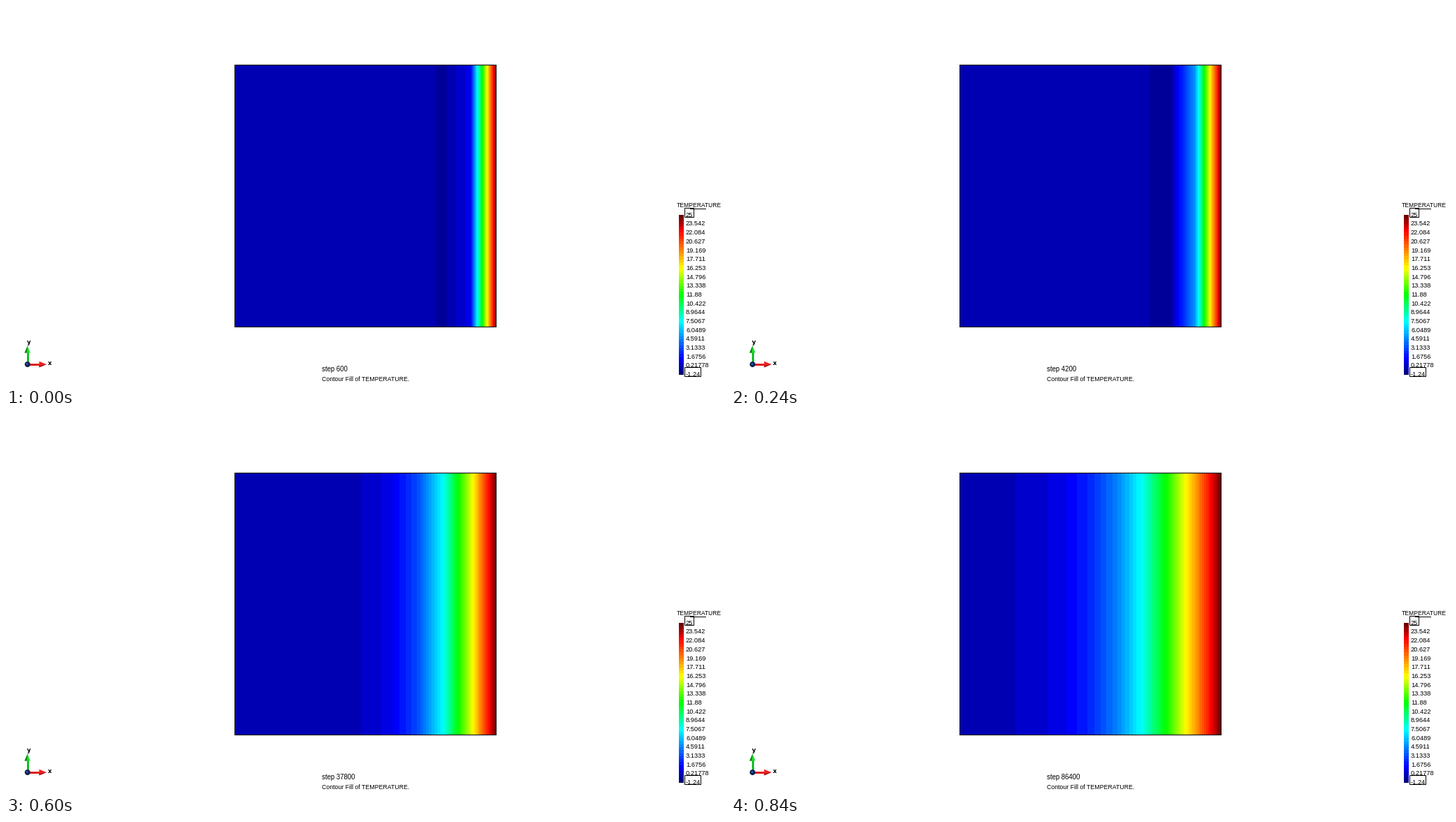
A matplotlib script that plays this animation: 1029x544 px, repeating every 0.96 s.

```python
import numpy as np
import matplotlib.pyplot as plt
from matplotlib.animation import FuncAnimation
from matplotlib.patches import Circle, Polygon, Rectangle

W, H, DPI = 1029, 544, 64
PT = 72 / DPI  # points per pixel
LEFT, RIGHT, TOP, BOTTOM = 327, 702, 84, 460
T_MIN, T_MAX, BANDS, LABELS = -1.24, 25.0, 54, 18

ELEMENTS, DT, DIFFUSIVITY = 5, 60, 0.072  # seconds, px^2 per second
SIZE = (RIGHT - LEFT) / ELEMENTS
NODES = 2 * ELEMENTS + 1

# Output times double their spacing up to one day
STEPS = [min(600 * (2 ** (k + 1) - 1), 86400) for k in range(8)]


def heat_step():
    """Implicit time step with quadratic elements; node 0 is the hot wall."""
    mass = np.array([[4, 2, -1], [2, 16, 2], [-1, 2, 4]]) / 30
    stiff = np.array([[7, -8, 1], [-8, 16, -8], [1, -8, 7]]) / 3
    ahead, behind = np.zeros((2, NODES, NODES))
    for e in range(ELEMENTS):
        cell = slice(2 * e, 2 * e + 3)
        ahead[cell, cell] += mass + DIFFUSIVITY * DT / SIZE ** 2 * stiff
        behind[cell, cell] += mass
    ahead[0] = behind[0] = np.eye(NODES)[0]
    return np.linalg.solve(ahead, behind)


def make_palette():
    stops = [0, 5, 17.5, 26.5, 35.5, 48, 53]
    idx = np.arange(BANDS)
    red = np.interp(idx, stops, [0, 0, 0, 0, 1, 1, 0.42])
    green = np.interp(idx, stops, [0, 0, 1, 1, 1, 0, 0])
    blue = np.interp(idx, stops, [0.5, 1, 1, 0, 0, 0, 0])
    return np.stack([red, green, blue], axis=1)


HEAT = heat_step()
PALETTE = make_palette()


def field(seconds):
    """One row of banded colours across the plate, inside its outline."""
    nodal = T_MAX * np.linalg.matrix_power(HEAT, seconds // DT)[:, 0]
    depth = RIGHT - (np.arange(LEFT + 1, RIGHT - 1) + 0.5)
    temp = np.interp(depth, SIZE / 2 * np.arange(NODES), nodal)
    band = np.floor((temp - T_MIN) / (T_MAX - T_MIN) * BANDS).astype(int)
    return PALETTE[np.clip(band, 0, BANDS - 1)][np.newaxis]


fig = plt.figure(figsize=(W / DPI, H / DPI), dpi=DPI, facecolor="white")
ax = fig.add_axes([0, 0, 1, 1])


def label(x, y, text, px, **kw):
    kw = {"family": "Liberation Sans", **kw}
    return ax.text(x, y, text, fontsize=px * PT, va="baseline", **kw)


def block(x0, y0, x1, y1, color="black"):
    ax.add_patch(Rectangle((x0, y0), x1 - x0, y1 - y0, fc=color, ec="none"))


def frame_box(x0, y0, x1, y1):
    ax.add_patch(Rectangle((x0, y0), x1 - x0, y1 - y0, fill=False, ec="black",
                           lw=PT, joinstyle="miter", snap=False))


def strip(colors, x0, y0, x1, y1):
    return ax.imshow(colors, extent=(x0, x1, y1, y0),
                     interpolation="nearest", aspect="auto", zorder=2)


def shape(points, color):
    ax.add_patch(Polygon(points, closed=True, fc=color, ec="none"))


def draw_legend():
    label(959.5, 287.5, "TEMPERATURE", 8.5)
    block(979, 290, 1002, 291)
    strip(PALETTE[::-1, np.newaxis], 963, 299, 970, 528)
    for k in range(LABELS + 1):
        value = T_MAX - (T_MAX - T_MIN) * k / LABELS
        label(973, 301.8 + 12.68 * k, f"{value:.5g}", 9.3)
    frame_box(971.5, 289.5, 984.5, 302.5)
    frame_box(971.5, 517.5, 994.5, 530.5)


def draw_triad():
    shape([(29.5, 513), (29.5, 496), (32.5, 496), (32.5, 513)], "#10c020")
    shape([(26.5, 496.5), (30.7, 486.5), (35, 496.5)], "#20e030")
    shape([(26.5, 496.5), (30.7, 486.5), (30, 496.5)], "#108818")
    shape([(31, 511.5), (48, 511.5), (48, 514.5), (31, 514.5)], "#e01818")
    shape([(47.5, 508.7), (58, 513), (47.5, 517.3)], "#f02020")
    shape([(47.5, 515), (58, 513), (47.5, 517.3)], "#981010")
    ax.add_patch(Circle((30.8, 513), 4, fc="#10204c", ec="none"))
    ax.add_patch(Circle((30.3, 512.5), 1.6, fc="#2050a0", ec="none"))
    label(60.3, 513.5, "x", 8.5, family="DejaVu Sans", weight="bold")
    label(30.3, 484, "y", 8.5, family="DejaVu Sans", weight="bold")


block(LEFT, TOP, RIGHT, BOTTOM)
plate = strip(field(STEPS[0]), LEFT + 1, TOP + 1, RIGHT - 1, BOTTOM - 1)
draw_legend()
draw_triad()
counter = label(451.5, 523, "", 9.6)
label(451.5, 537, "Contour Fill of TEMPERATURE.", 8.8)
ax.set_xlim(0, W)
ax.set_ylim(H, 0)
ax.axis("off")


def update(k):
    plate.set_data(field(STEPS[k]))
    counter.set_text(f"step {STEPS[k]}")
    return plate, counter


anim = FuncAnimation(fig, update, frames=len(STEPS), interval=120, repeat=True)
plt.show()
```
